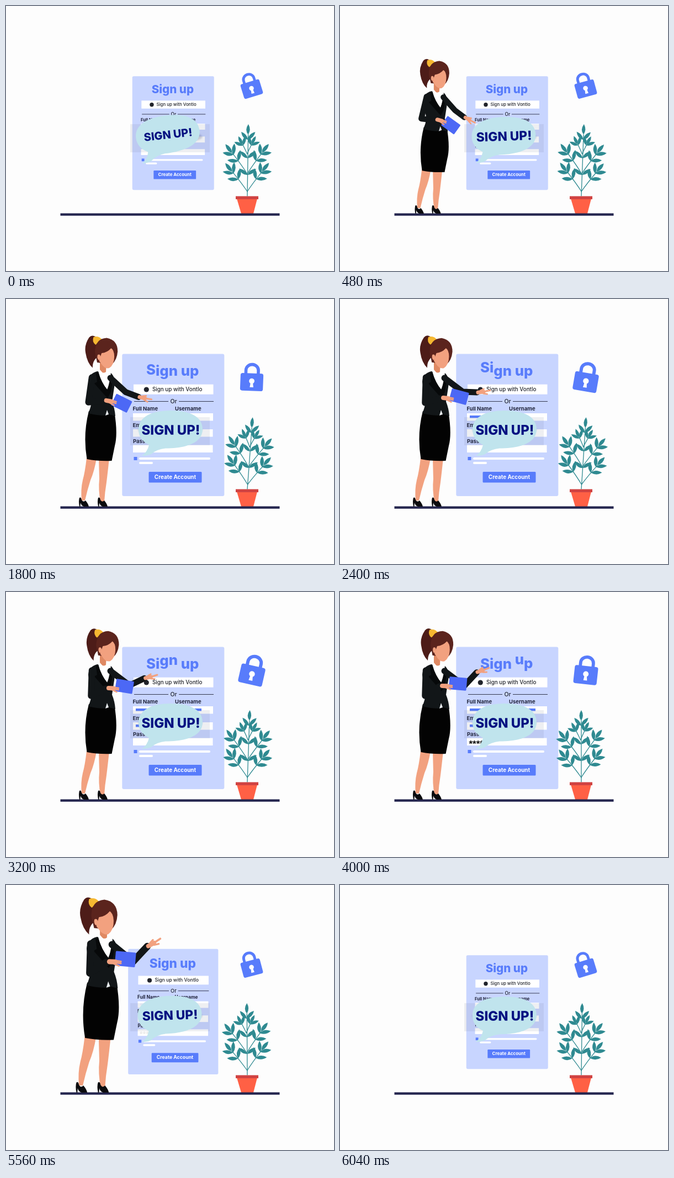
These frames come from a looping animation (594 by 480 pixels, 6.08 s). An HTML page:

```html
<!DOCTYPE html>
<html lang="en">
<head>
<meta charset="utf-8">
<title>Sign up</title>
<style>
  html, body { margin: 0; width: 100%; height: 100%; overflow: hidden; background: #fdfdfd; }
  svg { display: block; width: 594px; height: 480px; }
  text { font-family: Inter, "Open Sans", sans-serif; }
  .label { font-size: 9.5px; font-weight: 700; fill: #20243a; }
  .limb { fill: none; stroke-linecap: round; stroke-linejoin: round; }
  #stars { font: bold 17px "Liberation Sans", sans-serif; fill: #111; }
</style>
</head>
<body>
<svg viewBox="0 0 594 480">
  <rect width="594" height="480" fill="#fdfdfd"/>

  <g id="form">
    <rect x="210.3" y="99.500" width="185" height="257.500" rx="3" fill="#c8d5ff"/>
    <text id="title" x="254" fill="#587cfb" font-size="25.700" font-weight="800">Sign up</text>
    <g fill="#fff">
      <rect x="231" y="154.700" width="144.500" height="18"/>
      <rect x="230" y="207" width="67" height="13.500"/>
      <rect x="306" y="207" width="69" height="13.500"/>
      <rect x="230" y="236" width="144.500" height="13.500"/>
      <rect x="230" y="264.500" width="144.500" height="13.500"/>
      <rect x="241" y="287" width="129" height="4" rx="2"/>
      <rect x="241" y="295" width="25" height="4" rx="2"/>
    </g>
    <circle cx="254.300" cy="164" r="4.600" fill="#20232b"/>
    <text x="265" y="166.700" font-size="9.800" font-weight="500" fill="#20232b">Sign up with Vontlo</text>
    <path d="M232 185.500H294M313 185.500H376" stroke="#33374d" stroke-width="1.200"/>
    <text x="303.500" y="189" font-size="10.500" font-weight="500" text-anchor="middle" fill="#20232b">Or</text>
    <text class="label" x="229.500" y="201.500">Full Name</text>
    <text class="label" x="306" y="201.500">Username</text>
    <text class="label" x="229.500" y="231.500">Email</text>
    <text class="label" x="230" y="260.500">Password</text>
    <g id="typed">
      <g id="bars" fill="#587cfb"></g>
      <text id="stars" x="233.500" y="280.500"></text>
    </g>
    <rect x="231.500" y="286" width="6" height="6" fill="#587cfb"/>
    <rect x="258.500" y="313" width="96" height="19.500" rx="1.500" fill="#587cfb"/>
    <text x="306.500" y="325.700" font-size="9.900" font-weight="700" text-anchor="middle" fill="#fff">Create Account</text>
  </g>

  <g id="lock" fill="#587cfb">
    <path d="M-12 -14V-23A12 11 0 0 1 12 -23V-14" fill="none" stroke="#587cfb" stroke-width="6"/>
    <rect x="-22" y="-17" width="44" height="34" rx="4"/>
    <path d="M-2 0L-3.500 10H3.500L2 0Z" fill="#fff"/>
    <circle cy="-2" r="5.200" fill="#fff"/>
  </g>

  <g id="plant" fill="#2f8a91" stroke="#2f8a91" stroke-linecap="round"></g>
  <path d="M418 349H455L448 376H426Z" fill="#ff6045"/>
  <rect x="416" y="344.500" width="41" height="5.500" fill="#d04342"/>
  <rect x="98.500" y="375.500" width="397" height="4.300" fill="#25264f"/>

  <g id="woman">
    <g fill="#f2a17f">
      <path d="M146 288H164Q160 312 153 328Q147 347 143 365H137Q135 345 139 328Q143 314 146 288Z"/>
      <path d="M168 288H187Q184 316 182 332Q179 350 178 367H171Q167 346 169 326Z"/>
    </g>
    <g id="shoes" fill="#0b0b0e"></g>
    <path d="M150 203H196Q203 244 197 266L191.500 293Q167 294 146.500 290Q139 246 150 203Z" fill="#030303"/>
    <path d="M165 131Q150 135 149 150L155 185Q154 196 149 207Q164 211 180 211L183 208L198 212Q197 198 192 186L196 160Q199 142 190 134Z" fill="#121618"/>
    <path d="M167 130L189 133Q192 143 183 164Q172 151 167 130Z" fill="#fff"/>
    <path d="M170 112H182L181 132Q176 136 170 130Z" fill="#df8963"/>
    <path d="M167 130L170 128L178 137L184 131L190 134L184 145L178 139L172 145Z" fill="#fff"/>
    <path d="M163 134L167 133Q173 152 184 165L190 137L194 140L190 168L184 180L160 153L165 150Z" fill="#07090a"/>
    <path d="M180 211L183 201L186 209Z" fill="#e9edf0"/>
    <path id="armR" class="limb" stroke="#121618" stroke-width="11"/>
    <g id="handR" class="limb" stroke="#f2a17f">
      <path d="M-2 0H8" stroke-width="7"/>
      <path d="M8 0L20 -1" stroke-width="3.200"/>
      <path d="M7 3L14 5M3 -3L9 -5" stroke-width="2.800"/>
    </g>
    <rect id="tablet" x="-16" y="-11.500" width="32" height="23" rx="1.500" fill="#4c68f5"/>
    <path id="armL" class="limb" stroke="#121618" stroke-width="11.500"/>
    <g id="handL" class="limb" stroke="#f2a17f">
      <path d="M0 0H9" stroke-width="8"/>
      <path d="M8 -2L18 -1M8 1L18 2M7 3L15 6" stroke-width="2.700"/>
    </g>
    <g id="head">
      <path d="M168 73Q158 62 151 70Q142 84 145 98Q148 116 158 125Q157 114 165 106Z" fill="#4d1c18"/>
      <path d="M159 69Q168 66 174 73L163 83Q156 78 159 69Z" fill="#f6b831"/>
      <path d="M162 96Q162 72 183 70.500Q203 74 203 95Q202 110 193 118L166 115Z" fill="#5b241d"/>
      <path d="M172 96Q184 95 190 88Q197 92 197 104Q197 119 188 125Q180 127 174 118L168 110Q165 103 170 102Z" fill="#f2a17f"/>
      <path d="M162 96Q163 78 177 76Q191 78 191 89Q184 97 174 98Q171 106 169 114Q163 108 162 96Z" fill="#5b241d"/>
      <path d="M167 101Q172 99 172 106Q171 112 168 110Q165 106 167 101Z" fill="#f2a17f"/>
    </g>
  </g>

  <rect x="225" y="214" width="144" height="51" fill="#596080" opacity=".1"/>
  <ellipse cx="297.500" cy="237" rx="58" ry="11" fill="#566084" opacity=".28" style="filter: blur(1.500px)"/>
  <g id="bubble">
    <path d="M298 202C335 202 356 214 356 236C356 260 328 270.500 289 270.500Q273 272 263 281Q256 284 246 284Q257 276 259 264C246 258 240 248 240 236C240 213 265 202 298 202Z" fill="#c0e4ed"/>
    <text id="shout" text-anchor="middle" y="8.700" font-size="24" font-weight="800" fill="#041181">SIGN UP!</text>
  </g>
</svg>

<script>
const LOOP = 6080, STEP = 40;
const $ = id => document.getElementById(id);
const set = (id, value, name = 'transform') => $(id).setAttribute(name, value);
const clamp = x => Math.min(1, Math.max(0, x));
const smooth = (t, a, b) => { const p = clamp((t - a) / (b - a)); return p * p * (3 - 2 * p); };
const rad = deg => deg * Math.PI / 180;

function make(parent, tag, attrs) {
  const el = document.createElementNS('http://www.w3.org/2000/svg', tag);
  for (const key in attrs) el.setAttribute(key, attrs[key]);
  return $(parent).appendChild(el);
}

function leaf(x, y, angle, size) {
  make('plant', 'path', {
    stroke: 'none',
    transform: `translate(${x} ${y}) rotate(${angle}) scale(${size})`,
    d: 'M0 0Q9 -7.500 20 0Q10 6 0 0Z'
  });
}

// A curved branch with a leaf at its tip and opposite pairs behind it
function branch(rootY, dx, dy, pairs, size) {
  const x = 437, bend = [x + dx * .35, rootY + dy * .4], tip = [x + dx, rootY + dy];
  make('plant', 'path', { fill: 'none', 'stroke-width': 1.300, d: `M${x} ${rootY}Q${bend} ${tip}` });
  const angle = Math.atan2(tip[1] - bend[1], tip[0] - bend[0]) / rad(1);
  leaf(...tip, angle, size);
  for (let i = 0; i < pairs; i++) {
    const k = .93 - i * .27;
    const [px, py] = [0, 1].map(a => 2 * k * (1 - k) * bend[a] + k * k * tip[a] + (1 - k) ** 2 * [x, rootY][a]);
    for (const side of [-1, 1]) leaf(px, py, angle + side * (42 + i * 6), size);
  }
}

branch(344, 2, -111, 3, .95);
for (const side of [-1, 1]) {
  branch(336, side * 27, -36, 2, 1);
  branch(304, side * 27, -38, 2, 1);
  branch(268, side * 8, -17, 1, .85);
}

for (const x of [131, 165]) {
  make('shoes', 'path', {
    transform: `translate(${x} 0)`,
    d: 'M2 360Q5 358 6 364Q9 369 13 365Q18 371 19 376H10Q5 374 4 369L3.500 376H2Q0 366 2 360Z'
  });
}

// Three fields are filled one after the other
const bars = [[235, 211, 48], [311, 211, 43], [235, 240, 70]].map(([x, y, width]) =>
  ({ width, el: make('bars', 'rect', { x, y, height: 4.500 }) }));

function drawForm(t) {
  const s = .8 + .2 * (smooth(t, 500, 1800) - smooth(t, 5000, 6000));
  set('form', `translate(302.600 238) scale(${s}) translate(-302.600 -238)`);

  const crest = .5 + (t - 2400) / 380;
  const hop = i => 4 * (1 + Math.cos(Math.PI * Math.min(1, Math.abs(i - crest) / 1.500)));
  set('title', [...'Sign up'].map((c, i) => 138.500 - hop(i)).join(' '), 'y');

  bars.forEach(({ el, width }, i) => el.setAttribute('width', width * clamp((t - 2150 - i * 500) / 450)));
  $('stars').textContent = '*'.repeat(Math.round(8 * clamp((t - 3650) / 700)));
  set('typed', 1 - smooth(t, 5150, 5650), 'opacity');
}

// Springs from 0 to 1, overshooting
const spring = (u, decay) => u <= 0 ? 0 : 1 - Math.exp(-u / decay) * Math.cos(Math.PI * u / 230);

function drawWoman(t) {
  const size = spring(t - 40, 190) * spring(5810 - t, 135);
  set('woman', size > .01 ? 'inline' : 'none', 'display');
  set('woman', `translate(169 376) scale(${size}) translate(-169 -376)`);

  // The arm reaches out, then lifts, then she leans back
  const reach = smooth(t, 1300, 2350), lift = smooth(t, 2500, 3800), lean = smooth(t, 4100, 5050);
  set('head', `translate(${-2 + 2 * reach + lift - 6 * lean} ${2 * lean}) rotate(${reach + lift - 3 * lean} 176 128)`);

  const wx = 176 + 10 * reach - 2 * lift, wy = 188 - 9 * reach - 9 * lift;
  const turn = 36 - 21 * reach - 10 * lift;
  set('armL', `M155.500 142L${145 + 9 * reach} ${186 + 2 * reach}L${wx - 4} ${wy + 1}`, 'd');
  set('handL', `translate(${wx + 1} ${wy}) rotate(${turn * .4})`);
  set('tablet', `translate(${204 + 11.500 * reach - 2 * lift - 3.500 * lean} ${199 - 22 * reach - 11 * lift}) rotate(${turn})`);

  const ex = 212 + 10 * reach + 3 * lift - 3 * lean, ey = 169 - reach + 2 * lift;
  const angle = rad(37 - 35 * reach - 49 * lift), length = 26 + 2 * reach + 7 * lift;
  const px = ex + length * Math.cos(angle), py = ey + length * Math.sin(angle);
  set('armR', `M189 143L${ex} ${ey}L${px - 2 * Math.cos(angle)} ${py - 2 * Math.sin(angle)}`, 'd');
  set('handR', `translate(${px + 2} ${py}) rotate(${31 - 38 * reach - 10 * lift - 12 * lean})`);
}

function draw(t) {
  const phase = 2 * Math.PI * t / LOOP, wave = Math.cos(phase);
  drawForm(t);
  drawWoman(t);
  set('lock', `translate(445 150.500) rotate(${-2 - 15 * wave}) scale(${.91 - .1 * wave})`);
  set('plant', `rotate(${.6 + 2.600 * Math.sin(phase - .31)} 437 345)`);

  const w = Math.exp(-t / 400) + .75 * Math.exp(-(((t - 5080) / 500) ** 2));
  set('bubble', `translate(${-5 * w} ${-4 * w}) rotate(${-6.500 * w} 298 237)`);
  set('shout', `translate(298.500 237) scale(${1 - .17 * w})`);
}

const start = performance.now();
function tick() {
  const t = Math.max(0, performance.now() - start) % LOOP;
  draw(Math.floor(t / STEP) * STEP);
  requestAnimationFrame(tick);
}
tick();
</script>
</body>
</html>
```
